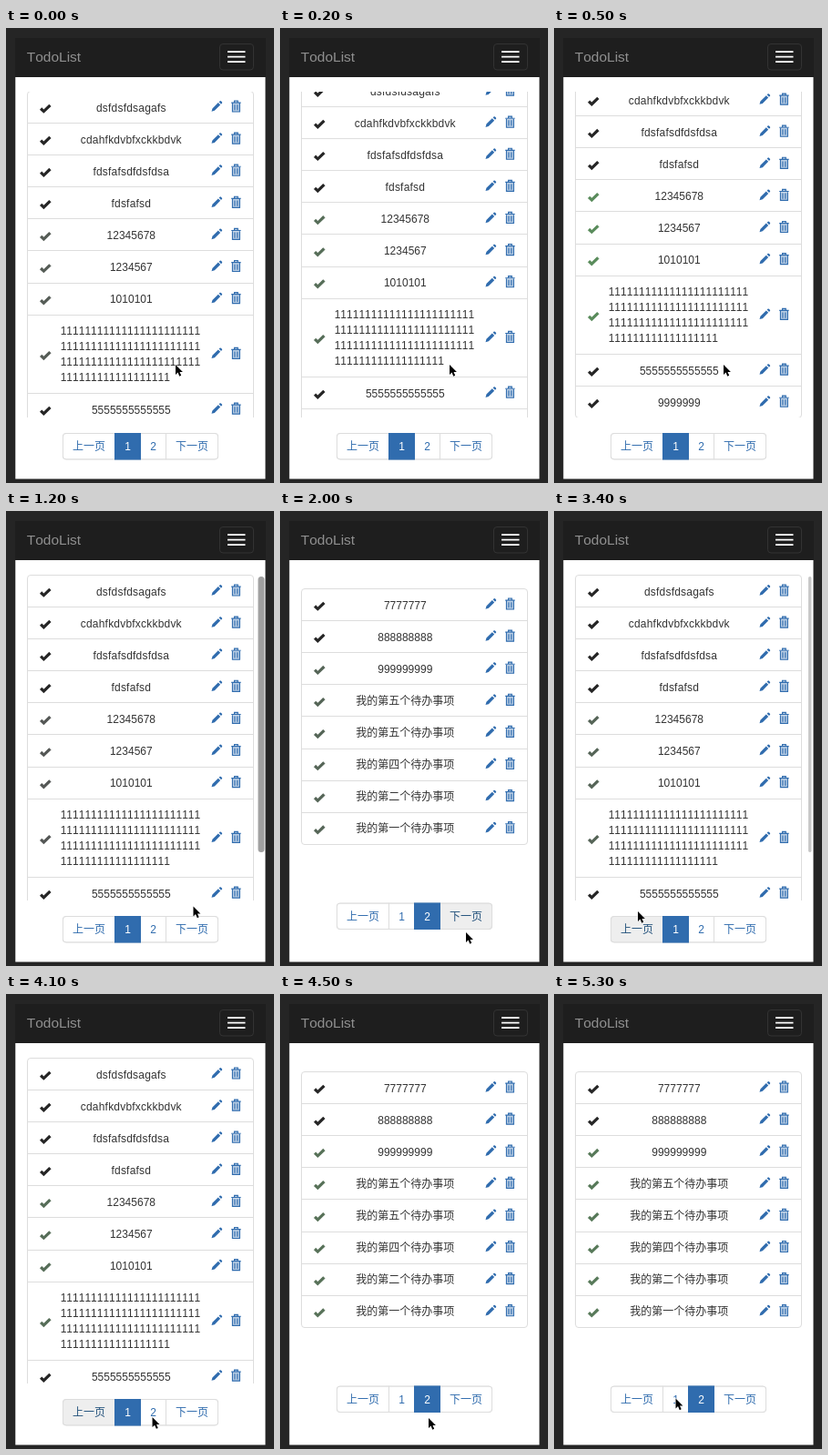
Animation of 294x500 px, one loop 5400 ms. Source, as an HTML page:

```html
<!DOCTYPE html>
<html lang="zh">
<head>
<meta charset="utf-8">
<style>
  html, body { margin: 0; height: 100%; overflow: hidden; background: #252525; }
  svg { display: block; width: 294px; height: 500px; }
  text { font: 12px "Liberation Sans", "Noto Sans CJK SC", "Noto Sans CJK", sans-serif; font-kerning: none; fill: #333; }
  .mid { text-anchor: middle; }
  .word { letter-spacing: .2px; }
  .brand { font-size: 15.5px; fill: #909090; }
  .line { fill: none; stroke: #ddd; }
  .blue { fill: #306cae; }
  .can { fill: #306cae55; stroke: #306cae; stroke-width: 1.2; }
</style>
</head>
<body>
<svg viewBox="0 0 294 500">
  <defs>
    <clipPath id="view"><rect x="10" y="70" width="274" height="358"/></clipPath>
    <path id="check" d="M-6.3 1.3L-4-1L-1.9 1.1L4-4.7L6.3-2.4L-1.9 5.5Z"/>
    <g id="tools">
      <path class="blue" transform="translate(231.2 -.5) scale(.92)" d="M-6.2 6.2L-5.2 2.6L1.7-4.3L4.3-1.7L-2.6 5.2ZM2.6-5.2L3.9-6.4Q4.5-6.7 5.1-6.2L6.2-5.1Q6.7-4.5 6.4-3.9L5.2-2.6Z"/>
      <path class="can" transform="translate(252.4 -.5) scale(.95)" d="M-5.5-4.2H5.5M-2-4.5V-6.4H2V-4.5M-4.2-3.5V6.3H4.2V-3.5M-1.5-2V4.5M1.5-2V4.5"/>
    </g>
  </defs>
  <rect width="294" height="500" fill="#252525"/>
  <rect x="10" y="11" width="275" height="43" fill="#1e1e1e"/>
  <rect x="10.300" y="54" width="274.200" height="441.500" fill="#fff"/>
  <text class="brand" x="22.7" y="37">TodoList</text>
  <rect x="234.5" y="17.5" width="37" height="28.500" rx="3.5" fill="none" stroke="#333"/>
  <path d="M243 26.200h19.500M243 31.600h19.500M243 37.100h19.500" stroke="#fff" stroke-width="1.8"/>
  <g clip-path="url(#view)"><g id="page1"></g></g>
  <g id="page2"></g>
  <rect id="bar" height="303"/>
  <g id="pager"></g>
  <path id="cursor" d="M0 0V11L2.500 8.600L4.300 12.700L6.200 11.800L4.500 7.900H7.900Z" fill="#000" stroke="#fff" paint-order="stroke"/>
</svg>
<script>
const LOOP = 5400, TO_PAGE2 = 2000, BACK = 3200, AGAIN = 4300, BLUE = '#306cae';
const $ = id => document.getElementById(id);
const label = (x, y, s, cls = '', fill = '') =>
  `<text class="${cls}" x="${x}" y="${y}"${fill && ` style="fill:${fill}"`}>${s}</text>`;

// A row is [text, done]; long text wraps at 23 characters.
function list(top, rows) {
  let y = top, out = '';
  rows.forEach(([s, done], i) => {
    const lines = s.match(/.{1,23}/g), wrapped = lines.length > 1;
    const h = wrapped ? 86.4 : 35.1, mid = y + h / 2;
    if (i) out += `<path class="line" d="M23 ${Math.round(y) + .5}H272"/>`;
    out += `<use href="#check" x="43.300" y="${mid + 1.8}" fill="${done ? 'var(--done)' : '#262626'}"/>
      <use href="#tools" y="${mid}"/>`;
    out += wrapped
      ? lines.map((l, k) => label(59.7, mid - 21 + k * 17.1, l)).join('')
      : label(137.3, mid + 5, s, /[a-z]/.test(s) ? 'mid word' : 'mid');
    y += h;
  });
  return out + `<rect class="line" x="23.5" y="${top + .5}" width="248" height="${Math.round(y) - top}" rx="3.5"/>`;
}

$('page1').innerHTML = list(70, [
  ['dsfdsfdsagafs'], ['cdahfkdvbfxckkbdvk'], ['fdsfafsdfdsfdsa'], ['fdsfafsd'],
  ['12345678', 1], ['1234567', 1], ['1010101', 1], ['1'.repeat(87), 1],
  ['5555555555555'], ['9999999']]);
$('page2').innerHTML = list(85, [
  ['7777777'], ['888888888'], ['999999999', 1],
  ...[...'五五四二一'].map(n => [`我的第${n}个待办事项`, 1])]);

const edges = [62.5, 119.5, 147.5, 175.5, 232.5];
function pager(page, grey) {
  const cells = ['上一页', '1', '2', '下一页'].map((s, i) => {
    const x = edges[i], w = edges[i + 1] - x, on = i === page;
    return `<rect x="${x}" y="445.5" width="${w}" height="28.5" fill="${on ? BLUE : i === grey ? '#eee' : '#fff'}" stroke="${on ? BLUE : '#ddd'}"/>`
      + label(x + w / 2, 464.4, s, 'mid', on ? '#fff' : i === grey ? '#23527c' : BLUE);
  });
  return `<clipPath id="round"><rect x="62" y="445" width="171" height="29.5" rx="4"/></clipPath>
    <g clip-path="url(#round)">${cells.join('')}</g>
    <rect class="line" x="62.5" y="445.5" width="170" height="28.5" rx="3.5"/>
    ${cells[page]}`;
}

// Eased interpolation over [time, ...values] keys.
function at(keys, t) {
  const i = keys.findIndex(k => k[0] > t);
  if (i < 0) return keys[keys.length - 1].slice(1);
  const [a, b] = [keys[i - 1], keys[i]];
  const p = (t - a[0]) / (b[0] - a[0]), e = p * p * (3 - 2 * p);
  return a.slice(1).map((v, k) => v + (b[k + 1] - v) * e);
}

const cursorKeys = [[0, 186, 370], [650, 186, 370], [900, 272, 376], [1200, 205.5, 434.5],
  [1600, 206, 457], [1900, 204, 463], [2300, 204, 463], [2700, 93, 429], [3000, 92, 440],
  [3700, 92, 440], [4150, 163, 466], [4800, 163, 466], [5300, 133.5, 444.5]];
const scrollKeys = [[0, 1], [450, 44], [650, 44], [1050, 0]];
const doneKeys = [[0, .1], [500, 1], [1200, 0], [2700, .5], [3400, .25], [4500, .5], [5300, .65]];
const barKeys = [[0, 0], [700, 0], [800, 1], [1700, 1], [2000, 0], [3200, 0], [3210, 1], [3700, 1], [4100, 0]];
let pagerState;

function draw(t) {
  const second = (t >= TO_PAGE2 && t < BACK) || t >= AGAIN;
  const [scroll] = at(scrollKeys, t), [done] = at(doneKeys, t);
  $('page1').style.display = second ? 'none' : '';
  $('page2').style.display = second ? '' : 'none';
  $('page1').setAttribute('transform', `translate(0 ${-scroll})`);
  document.body.style.setProperty('--done', `rgb(${85 + 5 * done},${88 + 52 * done},${86 + 6 * done})`);

  const thick = t < TO_PAGE2, w = thick ? 7 : 3.5;
  Object.entries({ x: thick ? 276.5 : 279, y: 72 + scroll * 1.15, width: w, rx: w / 2,
    fill: thick ? '#a0a0a0' : '#c8c8c8', opacity: at(barKeys, t)[0] })
    .forEach(([k, v]) => $('bar').setAttribute(k, v));

  const grey = t >= 1500 && t < BACK ? 3 : t >= BACK && t < AGAIN ? 0 : -1;
  const state = `${second},${grey}`;
  if (state !== pagerState) $('pager').innerHTML = pager(second ? 2 : 1, grey);
  pagerState = state;
  $('pager').setAttribute('transform', `translate(0 ${second ? -14.5 : 0})`);
  $('cursor').setAttribute('transform', `translate(${at(cursorKeys, t)})`);
}

const start = performance.now();
function tick() {
  const t = (performance.now() - start) % LOOP;
  draw(Math.floor(t / 100) * 100);
  requestAnimationFrame(tick);
}
tick();
</script>
</body>
</html>
```
